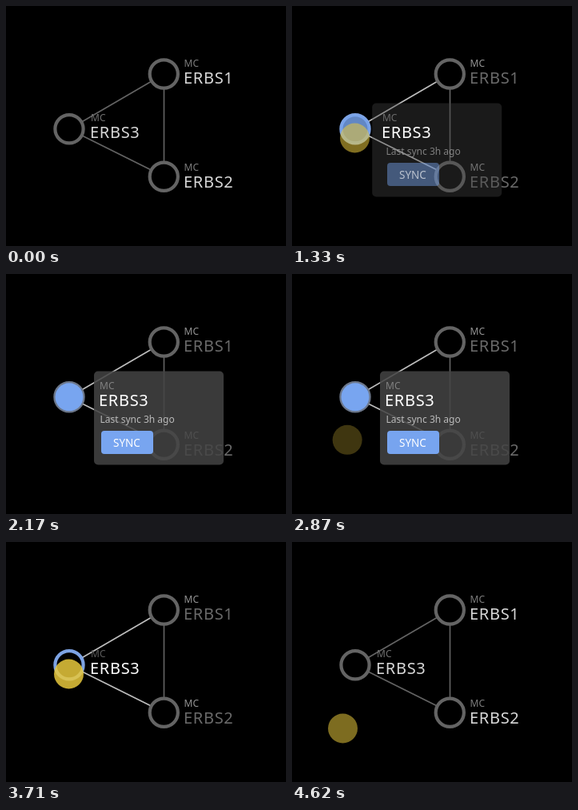
An HTML page for the animation above (4690 ms loop, 350 by 300 pixels).

```html
<!DOCTYPE html>
<html lang="en">
<head>
<meta charset="utf-8">
<title>Node sync</title>
<style>
  html, body { margin: 0; width: 100%; height: 100%; overflow: hidden; background: #000; }
  svg { display: block; width: 350px; height: 300px; font-family: "Noto Sans", "Open Sans", sans-serif; }
  .name { font-size: 20px; letter-spacing: .7px; }
  .type { font-size: 12px; }
  .note { font-size: 12px; fill: #bbb; }
  .action { font-size: 13.5px; fill: #fff; text-anchor: middle; }
  .link { stroke-width: 1.6; }
  .ring { fill: #000; stroke: #646464; stroke-width: 4.2; }
</style>
</head>
<body>
<svg viewBox="0 0 350 300">
  <rect width="350" height="300"/>
  <line class="link" x1="197.5" y1="85" x2="197.5" y2="213" stroke="#646464"/>
  <g id="links" class="link">
    <line x1="79" y1="154" x2="197.5" y2="85"/>
    <line x1="79" y1="154" x2="197.5" y2="213"/>
  </g>
  <circle class="ring" cx="197.3" cy="85" r="17.6"/>
  <circle class="ring" cx="197.3" cy="213.3" r="17.6"/>
  <circle class="ring" id="node" cx="79" cy="153.8" r="17.6"/>
  <circle id="fill" cx="79" cy="153.8" r="17.5" fill="#78a5f0"/>
  <g id="others">
    <text class="type" x="222.5" y="76">MC</text>
    <text class="name" x="222" y="97">ERBS1</text>
    <text class="type" x="222.5" y="205.5">MC</text>
    <text class="name" x="222" y="226.5">ERBS2</text>
  </g>
  <rect id="panel" x="110" y="121.5" width="162" height="117" rx="5" fill="#444"/>
  <rect id="button" x="119" y="196" width="65" height="29" rx="4" fill="#78a5f0"/>
  <g id="content">
    <text class="note" x="117.5" y="185.5">Last sync 3h ago</text>
    <text class="action" x="151" y="215.5">SYNC</text>
  </g>
  <g id="label">
    <text class="type" id="kind" x="106" y="144">MC</text>
    <text class="name" id="title" x="105" y="165">ERBS3</text>
  </g>
  <circle id="cursor" r="18.5" fill="#e8c83c"/>
</svg>
<script>
const LOOP = 4690, STEP = 70;
const OPEN = 1120, CLOSE = 3290, LEAVE = 3850;
const $ = id => document.getElementById(id);
const names = document.querySelectorAll('#others .name');
const types = document.querySelectorAll('#others .type');

const mix = (a, b, p) => a + (b - a) * p;
const rgb = (a, b, p) => `rgb(${a.map((v, i) => Math.round(mix(v, b[i], p)))})`;
const gray = (a, b, p) => rgb([a, a, a], [b, b, b], p);
const set = (el, attrs) => {
  for (const key in attrs) el.setAttribute(key, attrs[key]);
};

// Eased rise from 0 to 1 between two times.
function ramp(t, from, to) {
  const x = Math.min(1, Math.max(0, (t - from) / (to - from)));
  return x < .5 ? 2 * x * x : 1 - 2 * (1 - x) ** 2;
}

// Rises at one time and falls at another, both over the same duration.
const between = (t, on, off, dur) => ramp(t, on, on + dur) - ramp(t, off, off + dur);

function draw(t) {
  const away = between(t, 1610, 2660, 630);
  const travel = between(t, 100, LEAVE, 900) - .8 * away
    + ramp(t, LEAVE, LEAVE + 900) - ramp(t, LEAVE, LEAVE + 770);
  const press = between(t, OPEN, OPEN + 210, 210) + between(t, CLOSE, CLOSE + 210, 210);
  const shown = ramp(t, 0, 280) - between(t, 1680, 2730, 350) - ramp(t, 4450, 4850);
  const focus = between(t, 420, LEAVE, 420);
  const hover = between(t, 560, LEAVE, 350) - .7 * between(t, 1680, 3080, 350);
  const open = between(t, OPEN + 10, CLOSE, 420);
  const slide = between(t, OPEN - 30, CLOSE, 420);
  const fill = between(t, OPEN - 70, CLOSE, 400);

  set($('cursor'), {
    cx: mix(63.5, 78.5, travel),
    cy: mix(233, 165, travel),
    opacity: .85 * shown * (1 - .35 * press)
  });
  set($('links'), { stroke: gray(100, 190, focus) });
  names.forEach(el => set(el, { fill: gray(215, 105, focus) }));
  types.forEach(el => set(el, { fill: gray(125, 148, focus) }));
  set($('title'), { fill: gray(215, 255, focus) });
  set($('kind'), { fill: gray(mix(112, 90, focus), 130, open) });
  set($('node'), { style: `stroke:${rgb([100, 100, 100], [125, 163, 228], hover)}` });
  set($('fill'), { opacity: fill });
  set($('panel'), { opacity: .86 * open, transform: `translate(${-18 * (1 - open)})` });
  set($('button'), { opacity: open * (1 - .1 * ramp(t, 2800, CLOSE)) });
  set($('content'), { opacity: slide });
  set($('label'), { transform: `translate(${11 * slide})` });
}

const start = performance.now();
function tick() {
  const t = (performance.now() - start) % LOOP;
  draw(Math.floor(t / STEP) * STEP);
  requestAnimationFrame(tick);
}
tick();
</script>
</body>
</html>
```
